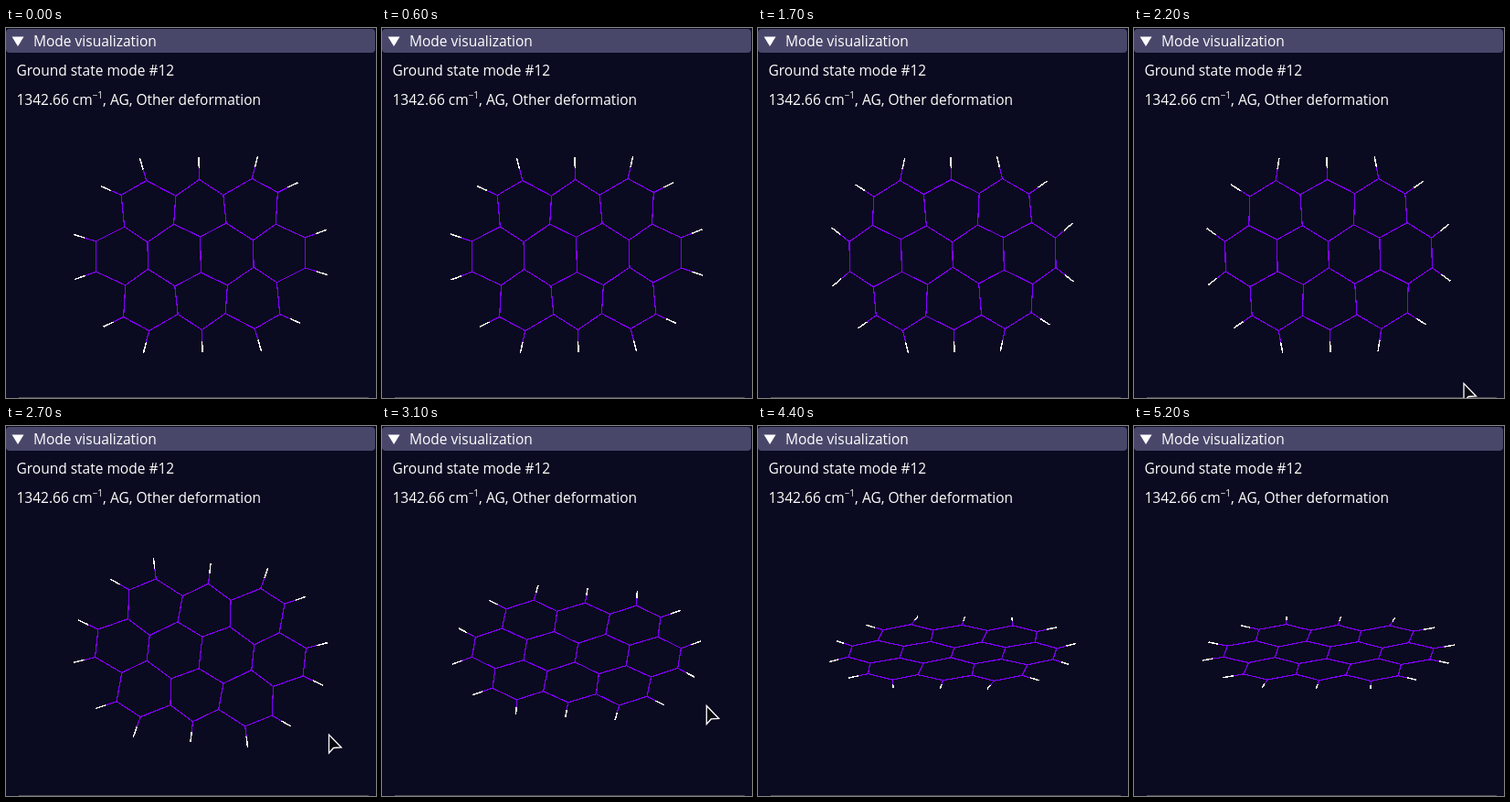
Recreate the animation shown at these times as an HTML page. Size 405x404 px, loop 5.3 s.

```html
<!DOCTYPE html>
<html lang="en">
<head>
<meta charset="utf-8">
<title>Mode visualization</title>
<style>
html, body { margin: 0; width: 100%; height: 100%; overflow: hidden; background: #0a0a20; }
svg { display: block; width: 405px; height: 404px; }
text { font: 15.5px "Open Sans", "Noto Sans", sans-serif; fill: #fff; }
.sup { font-size: 10px; }
.bond { fill: none; shape-rendering: crispEdges; }
</style>
</head>
<body>
<svg viewBox="0 0 405 404">
  <rect width="405" height="404" fill="#0a0a20"/>
  <rect y="1" width="404" height="26" rx="4" fill="#48476a"/>
  <path d="M6.500 9.500H19.500L13 20Z" fill="#fff"/>
  <text x="30" y="20">Mode visualization</text>
  <text x="11.500" y="52">Ground state mode #12</text>
  <text x="11.500" y="84">1342.66 cm<tspan class="sup" dy="-7">−1</tspan><tspan dy="7">, AG, Other deformation</tspan></text>
  <rect id="strip" x="14" y="403" width="383" height="1"/>
  <path id="carbon" class="bond" stroke="#8000ff" stroke-width="1.2"/>
  <path id="hydrogen" class="bond" stroke="#fff" stroke-width="1.5"/>
  <path id="cursor" d="M0 0V20L5 14.500L13.500 14Z" fill="#08080f" stroke="#fff" stroke-width="1.3"/>
</svg>
<script>
const LOOP = 5300, STEP = 100, CX = 213, CY = 247.5;
const CC = 32.8, CH = 24.4;                        // bond lengths
const UX = CC * Math.sqrt(3) / 2, UY = CC / 2;     // lattice units
const { PI, sin, cos, sign, abs, hypot } = Math;
const $ = id => document.getElementById(id);

// How a carbon at lattice place (i, n) vibrates
function carbonMode(i, n) {
  const wave = cos(PI * n / 2);
  const out = 3.4 * cos(PI * n / 10) * cos(PI * i / 2) * Math.exp(-i * i / 6)
    - wave * sin(PI * abs(i) / 2);
  return { dx: sign(i) * cos(PI * i) - 1.4 * sin(PI * i / 2) * wave, dy: sign(n) * out };
}

// Carbons: corners of the hexagons in rows of 3, 4 and 3
function buildCarbons() {
  const atoms = new Map();
  for (let row = -1; row <= 1; row++) {
    const edge = row ? 2 : 3;
    for (let col = -edge; col <= edge; col += 2) {
      for (let k = 0; k < 6; k++) {
        const a = PI / 6 + k * PI / 3;
        const i = col + Math.round(cos(a) * 2 / Math.sqrt(3));
        const n = 3 * row + Math.round(sin(a) * 2);
        atoms.set(i + "," + n, { i, n, x: i * UX, y: n * UY, ...carbonMode(i, n) });
      }
    }
  }
  return [...atoms.values()];
}

// A rim carbon carries a hydrogen that swings across its bond
function addHydrogen(c, [a, b]) {
  const vx = 2 * c.x - a.x - b.x, vy = 2 * c.y - a.y - b.y, len = hypot(vx, vy);
  const bx = vx / len, by = vy / len;
  const swing = -sign(c.i * c.n) * (2.5 + 0.45 * abs(c.n) + 2 * cos(PI * c.i));
  return {
    x: c.x + bx * CH, y: c.y + by * CH,
    dx: c.dx - by * swing, dy: c.dy + bx * swing
  };
}

const carbons = buildCarbons();
const rings = [], rim = [];
carbons.forEach((c, k) => {
  const linked = carbons.filter(o => o !== c && hypot(o.x - c.x, o.y - c.y) < CC * 1.2);
  linked.forEach(o => { if (carbons.indexOf(o) > k) rings.push([c, o]); });
  if (linked.length === 2) rim.push([c, addHydrogen(c, linked)]);
});

const progress = (t, from, to) => Math.min(1, Math.max(0, (t - from) / (to - from)));
const line = (a, b) => `M${a.map(v => v.toFixed(2))}L${b.map(v => v.toFixed(2))}`;

// Pointer stops: time, x, y
const stops = [
  [1800, 362, 402], [2200, 361, 388], [2700, 353.5, 337],
  [3600, 357.5, 266], [3700, 357.5, 266], [4000, 387, 357]
];

function pointerAt(t) {
  const k = stops.findIndex(s => s[0] >= t);
  if (k < 0 || t < stops[0][0]) return null;
  const b = stops[k], a = stops[k - 1] || b, u = a === b ? 1 : progress(t, a[0], b[0]);
  return [a[1] + (b[1] - a[1]) * u, a[2] + (b[2] - a[2]) * u];
}

// Spin in the plane, tilt away from the viewer, roll on the screen
function projector(t) {
  const q = cos(2 * PI * (t / 650 - 6.8e-9 * t * t));
  const spin = 0.023 + 0.119 * progress(t, 2400, 2700);
  const tilt = 68.5 * PI / 180 * (1 - (1 - progress(t, 2400, 3600)) ** 1.4);
  const roll = -0.041;
  return p => {
    const x = p.x + p.dx * q, y = p.y + p.dy * q;
    const u = x * cos(spin) - y * sin(spin);
    const v = (x * sin(spin) + y * cos(spin)) * cos(tilt);
    return [CX + u * cos(roll) - v * sin(roll), CY + u * sin(roll) + v * cos(roll)];
  };
}

function draw(t) {
  const place = projector(t);
  let inner = rings.map(([a, b]) => line(place(a), place(b))).join("");
  let outer = "";
  for (const [c, h] of rim) {
    const a = place(c), b = place(h), mid = [(a[0] + b[0]) / 2, (a[1] + b[1]) / 2];
    inner += line(a, mid);
    outer += line(mid, b);
  }
  $("carbon").setAttribute("d", inner);
  $("hydrogen").setAttribute("d", outer);

  const at = pointerAt(t);
  $("cursor").style.display = at ? "" : "none";
  if (at) $("cursor").setAttribute("transform", `translate(${at})`);
  $("strip").setAttribute("fill", at && at[1] > 395 ? "#66667a" : "#4a4a4e");
}

const start = performance.now();
let last = -1;
function tick() {
  const t = Math.floor(Math.max(0, performance.now() - start) % LOOP / STEP) * STEP;
  if (t !== last) draw(last = t);
  requestAnimationFrame(tick);
}
tick();
</script>
</body>
</html>
```
